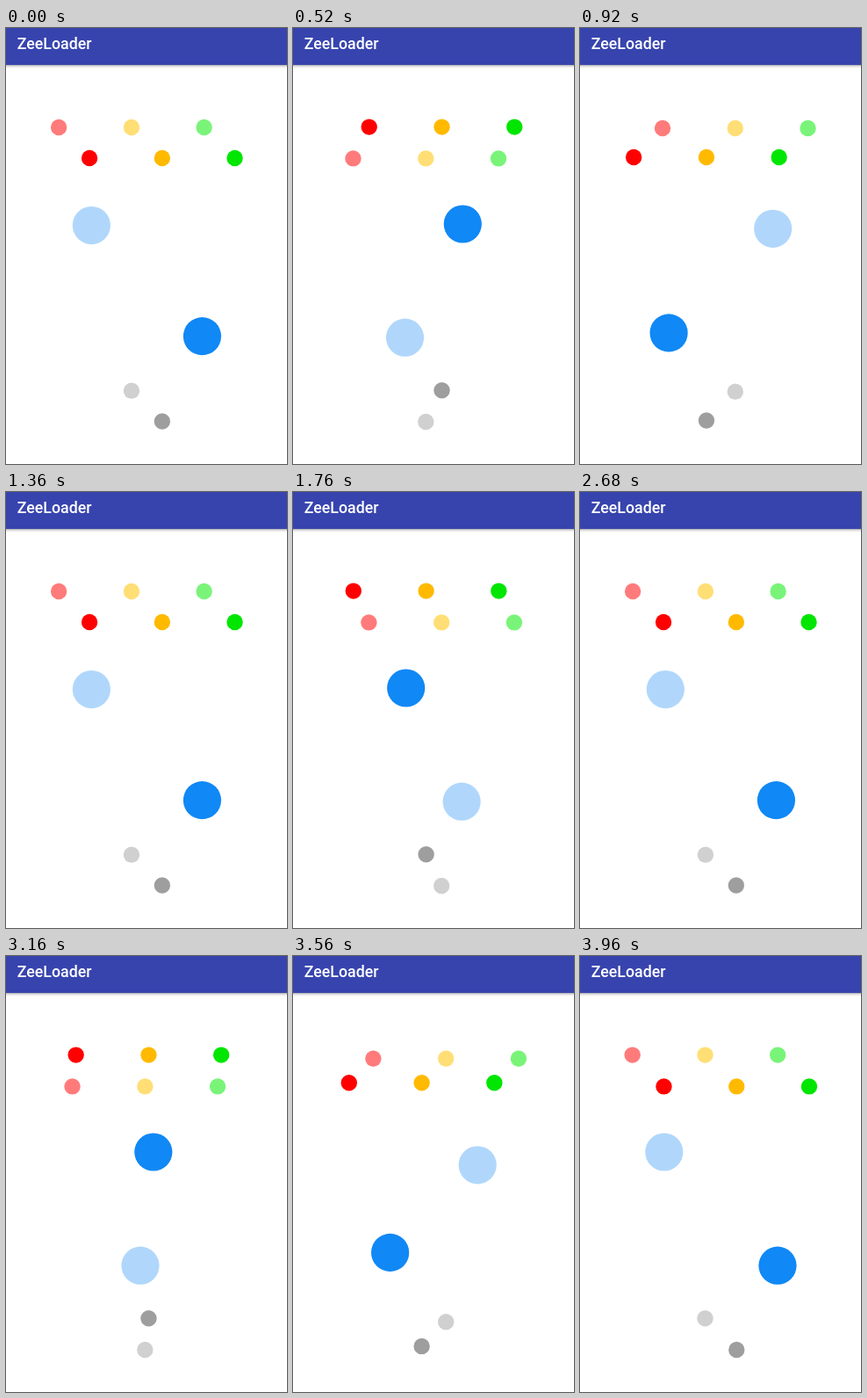
Write an HTML page that moves like this. It is 320x496 px and loops after 4 s.

```html
<!DOCTYPE html>
<html lang="en">
<head>
<meta charset="utf-8">
<title>ZeeLoader</title>
<style>
  html, body { margin: 0; width: 100%; height: 100%; overflow: hidden; background: #fff; }
  svg { display: block; }
  text { font: 500 17.78px Roboto, sans-serif; fill: #fff; }
</style>
</head>
<body>
<svg id="stage" width="320" height="496" viewBox="0 0 320 496">
  <defs>
    <linearGradient id="shade" x1="0" y1="0" x2="0" y2="1">
      <stop offset="0" stop-color="#000" stop-opacity=".34"/>
      <stop offset=".45" stop-color="#000" stop-opacity=".1"/>
      <stop offset="1" stop-color="#000" stop-opacity="0"/>
    </linearGradient>
  </defs>
  <rect width="320" height="42" fill="#3744ae"/>
  <rect y="42" width="320" height="4" fill="url(#shade)"/>
  <text x="12.7" y="24">ZeeLoader</text>
</svg>
<script>
const LOOP = 4000;
const MOVE = 300;
// Start of each move; the dots rest at a corner until the next one begins.
const STARTS = [-20, 320, 660, 1000, 1340, 1660, 1980, 2320, 2660, 3000, 3327, 3653, 3980];
// Corners visited by the dark dot; the light dot mirrors it through the centre.
const CORNERS = [[1, 1], [-1, -1], [1, -1], [-1, 1]];

const loaders = [
  { x: 77.6, y: 130.5, reach: 17.9, r: 9.2, dark: '#ff0000', light: '#ff7b7b' },
  { x: 160.4, y: 130.5, reach: 17.9, r: 9.2, dark: '#ffba00', light: '#ffde75' },
  { x: 243.1, y: 130.5, reach: 17.9, r: 9.2, dark: '#00e600', light: '#79f479' },
  { x: 160.4, y: 287.6, reach: 64.6, r: 21.6, dark: '#1088f5', light: '#b0d7fb' },
  { x: 160.4, y: 430.1, reach: 17.9, r: 9.2, dark: '#9e9e9e', light: '#d0d0d0' },
];

const stage = document.getElementById('stage');

function addDot(r, fill) {
  const dot = document.createElementNS('http://www.w3.org/2000/svg', 'circle');
  dot.setAttribute('r', r);
  dot.setAttribute('fill', fill);
  return stage.appendChild(dot);
}

function place(dot, x, y) {
  dot.setAttribute('cx', x);
  dot.setAttribute('cy', y);
}

for (const l of loaders) {
  l.lightDot = addDot(l.r, l.light);
  l.darkDot = addDot(l.r, l.dark);
}

function draw(time) {
  const step = STARTS.findLastIndex(start => start <= time);
  const progress = Math.min(1, (time - STARTS[step]) / MOVE);
  const eased = (1 - Math.cos(Math.PI * progress)) / 2;
  const from = CORNERS[step % 4];
  const to = CORNERS[(step + 1) % 4];
  const [dx, dy] = from.map((v, i) => v + (to[i] - v) * eased);

  for (const { x, y, reach, lightDot, darkDot } of loaders) {
    place(darkDot, x + dx * reach, y + dy * reach);
    place(lightDot, x - dx * reach, y - dy * reach);
  }
}

function tick() {
  draw(performance.now() % LOOP);
  requestAnimationFrame(tick);
}
tick();
</script>
</body>
</html>
```
